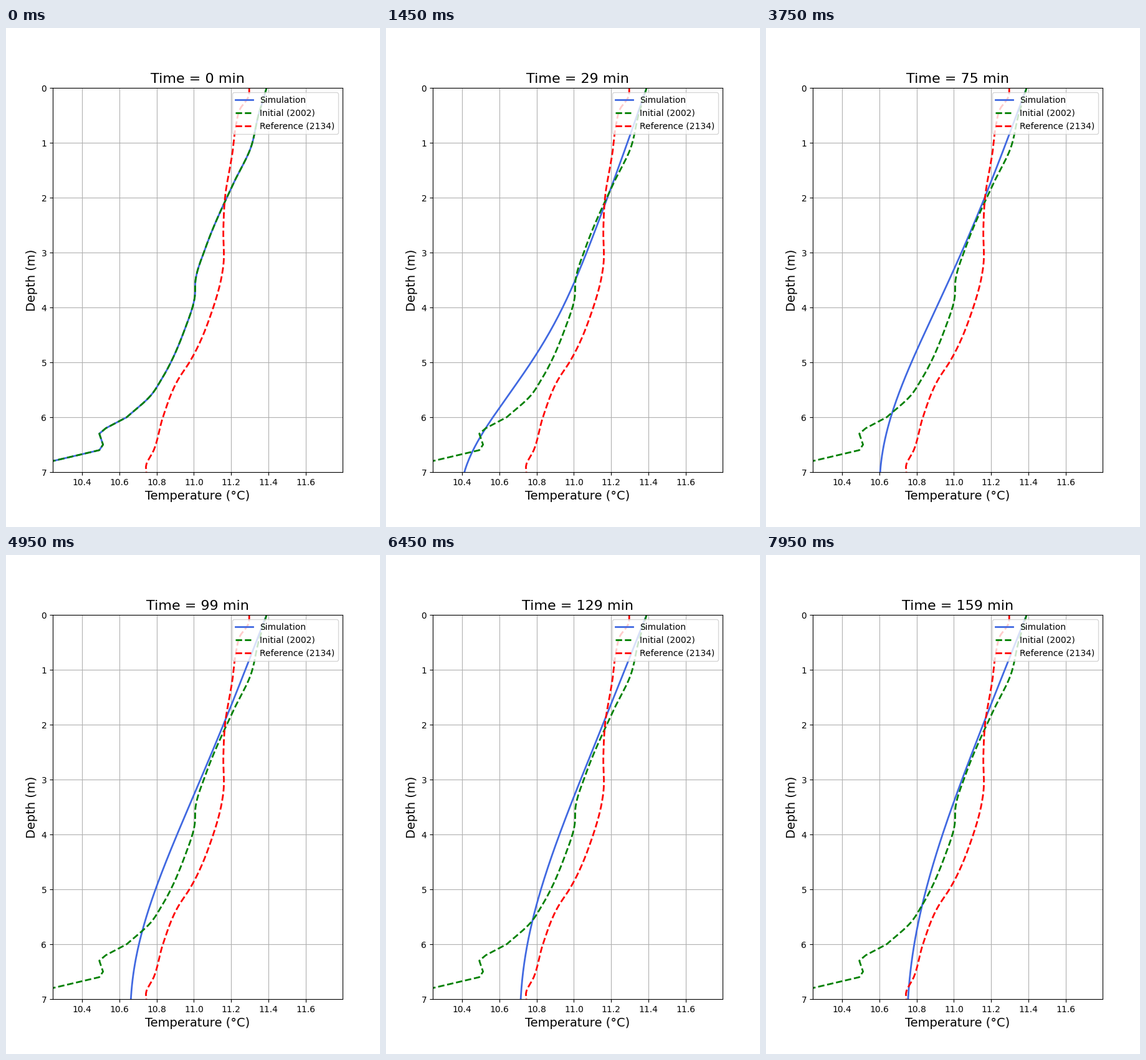
These frames come from a looping animation (600x800 px, 8 s). A matplotlib script:

```python
import numpy as np
import matplotlib.pyplot as plt
from matplotlib.animation import FuncAnimation

FRAMES = 160          # one frame per simulated minute
DEPTH = 7.0           # m
KAPPA = 0.036         # diffusivity, m2/min
DZ = 0.05             # m
SUBSTEPS = 40

z = np.linspace(0, DEPTH, round(DEPTH / DZ) + 1)


def smooth_curve(depths, temps):
    """Cubic Hermite curve through a few key points, sampled on z."""
    d, t = np.array(depths), np.array(temps)
    slope = np.gradient(t, d)
    i = np.clip(np.searchsorted(d, z, side="right") - 1, 0, len(d) - 2)
    h = d[i + 1] - d[i]
    u = np.clip((z - d[i]) / h, 0, 1)
    value = t[i] + (t[i + 1] - t[i]) * u * u * (3 - 2 * u)
    return value + h * u * (1 - u) * (slope[i] * (1 - u) - slope[i + 1] * u)


def initial_profile():
    """Smooth water column with a jagged cold layer at the bottom."""
    upper = smooth_curve(
        [0, 0.5, 1.1, 1.7, 2.9, 3.5, 3.8, 4.4, 5.3, 5.6, 6.0],
        [11.39, 11.346, 11.304, 11.218, 11.064, 11.009,
         11.005, 10.951, 10.828, 10.770, 10.640])
    lower = np.interp(z, [6.0, 6.2, 6.3, 6.5, 6.6, 7.0],
                      [10.640, 10.528, 10.493, 10.513, 10.493, 9.990])
    return np.where(z < 6, upper, lower)


def reference_profile():
    return smooth_curve(
        [0, 0.15, 0.4, 0.6, 1.2, 2.0, 2.6, 3.2, 4.1, 5.0, 5.3, 6.0, 6.6, 6.9, 7.0],
        [11.297, 11.294, 11.245, 11.230, 11.206, 11.167, 11.158, 11.159,
         11.094, 10.976, 10.918, 10.834, 10.785, 10.743, 10.745])


def bottom_temp(minute):
    """The cold bottom warms fast at first, then ever more slowly."""
    return 10.938 - 0.948 * np.exp(-0.0784 * minute ** 0.6)


def simulate(start):
    """Explicit heat diffusion with the surface held fixed."""
    temp = start.copy()
    dt = 1 / SUBSTEPS
    r = KAPPA * dt / DZ ** 2
    profiles = [start]
    for minute in range(1, FRAMES):
        for sub in range(1, SUBSTEPS + 1):
            temp[1:-1] += r * (temp[2:] - 2 * temp[1:-1] + temp[:-2])
            temp[-1] = bottom_temp(minute - 1 + sub * dt)
        profiles.append(temp.copy())
    return profiles


initial = initial_profile()
profiles = simulate(initial)

fig, ax = plt.subplots(figsize=(6, 8), dpi=100)
sim_line, = ax.plot(initial, z, color="royalblue", lw=2, label="Simulation")
ax.plot(initial, z, "--", color="green", lw=2, label="Initial (2002)")
ax.plot(reference_profile(), z, "--", color="red", lw=2,
        label="Reference (2134)")
ax.set_xlim(10.2434, 11.7974)
ax.set_ylim(DEPTH, 0)
ax.set_xlabel("Temperature (°C)", fontsize=14)
ax.set_ylabel("Depth (m)", fontsize=14)
title = ax.set_title("Time = 0 min", fontsize=16)
ax.grid(True)
ax.legend(loc="upper right")


def update(minute):
    sim_line.set_xdata(profiles[minute])
    title.set_text(f"Time = {minute} min")
    return sim_line, title


anim = FuncAnimation(fig, update, frames=FRAMES, interval=50, repeat=True)
plt.show()
```
